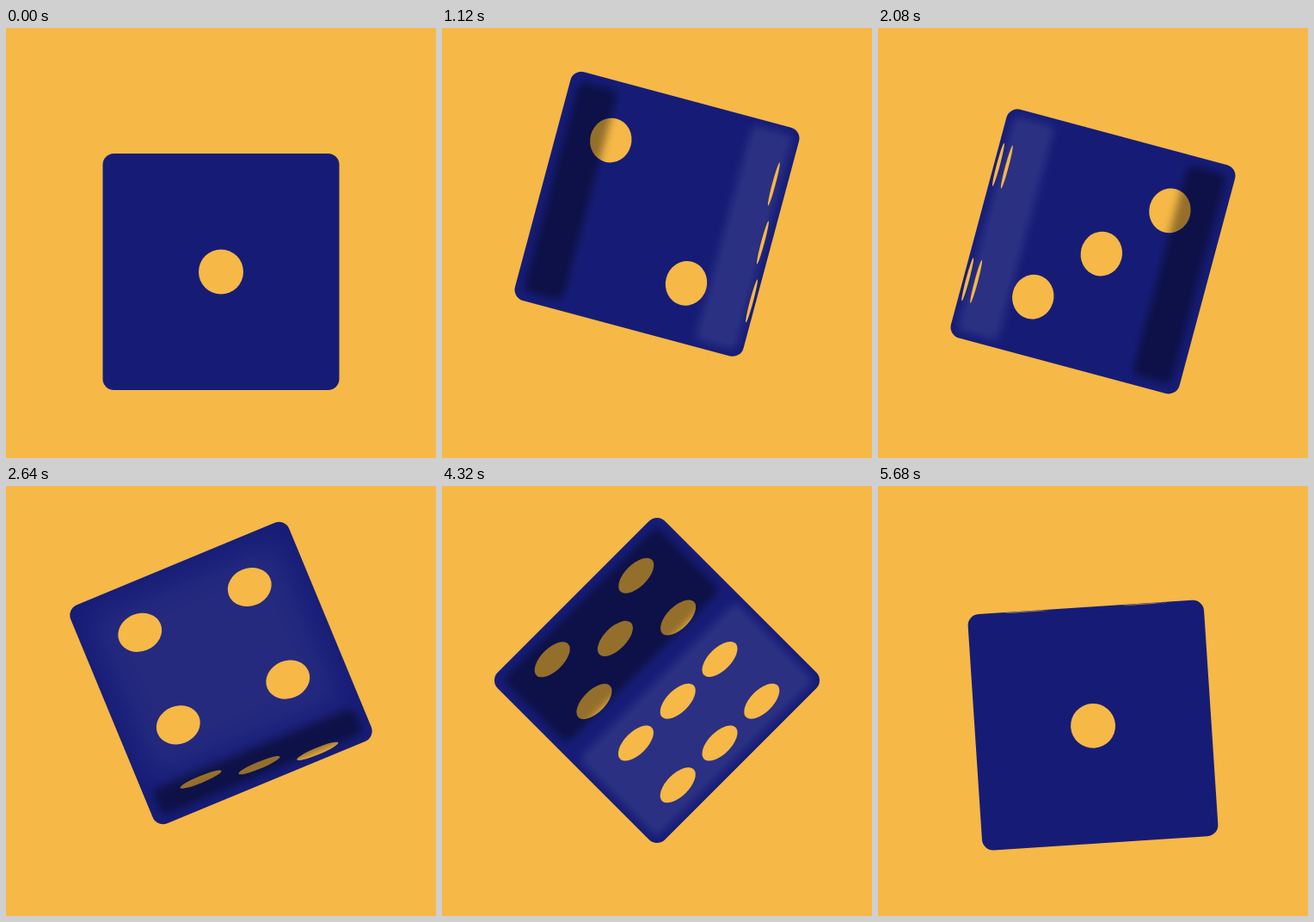
An HTML page that plays this animation: 500x500 px, repeating every 5.72 s.

```html
<!DOCTYPE html>
<html lang="en">
<head>
<meta charset="utf-8">
<title>Rolling die</title>
<style>
  html, body { margin: 0; width: 100%; height: 100%; overflow: hidden; background: #f6b847; }
  svg { display: block; width: 100%; height: 100%; }
</style>
</head>
<body>
<svg viewBox="0 0 500 500">
  <defs>
    <clipPath id="body"><rect x="-137.5" y="-137.5" width="275" height="275" rx="13"/></clipPath>
    <filter id="softLight" filterUnits="userSpaceOnUse" x="-230" y="-230" width="460" height="460" color-interpolation-filters="sRGB">
      <feGaussianBlur id="lightBlur" stdDeviation="5"/>
    </filter>
    <filter id="softDark" filterUnits="userSpaceOnUse" x="-230" y="-230" width="460" height="460" color-interpolation-filters="sRGB">
      <feGaussianBlur stdDeviation="5"/>
    </filter>
  </defs>
  <rect width="500" height="500" fill="#f6b847"/>
  <g id="die">
    <rect x="-137.5" y="-137.5" width="275" height="275" rx="13" fill="#161c76"/>
    <g clip-path="url(#body)">
      <rect id="light" rx="8" fill="#fff" filter="url(#softLight)"/>
      <g id="leaving" fill="#f6b847"></g>
      <g id="entering" fill="#f6b847"></g>
      <rect id="dark" rx="8" fill="#000" fill-opacity=".4" filter="url(#softDark)"/>
    </g>
  </g>
</svg>
<script>
const FRAME = 40, LOOP = 5720, TURN = 24, LAST = 142;
const SIZE = 275, HALF = SIZE / 2, GAP = 69, DOT = 26;
const FLOOR = 283.5, JUMP = 68;
const SIDES = [1, 1, -1, -1, 1, 1]; // side from which the next face enters

const corners = [[-1, -1], [1, -1], [-1, 1], [1, 1]];
const faces = [
  [[0, 0]],
  [[1, -1], [-1, 1]],
  [[-1, -1], [0, 0], [1, 1]],
  corners,
  [...corners, [0, 0]],
  [...corners, [-1, 0], [1, 0]]
];

const el = id => document.getElementById(id);
const set = (node, attrs) => {
  for (const name in attrs) node.setAttribute(name, attrs[name]);
};
const smooth = x => x * x * (3 - 2 * x);
const dots = points => points.map(([x, y]) =>
  `<circle cx="${x * GAP}" cy="${y * GAP}" r="${DOT}"/>`).join('');
const quarterTurn = points => points.map(([x, y]) => [-y, x]);

function easeOut(x) {
  const curve = (s, a, b) => 3 * (1 - s) ** 2 * s * a + 3 * (1 - s) * s * s * b + s ** 3;
  let low = 0, high = 1;
  for (let i = 0; i < 30; i++) {
    const mid = (low + high) / 2;
    if (curve(mid, 0.25, 0.32) < x) low = mid; else high = mid;
  }
  return curve(low, 0.45, 1);
}

function squash(node, x, scale) {
  set(node, { transform: `translate(${x} 0) scale(${scale} 1)` });
}

// A band along one side: outer and inner are distances from that side.
function band(node, side, outer, inner, inset) {
  const width = Math.max(0, inner - outer);
  set(node, {
    x: side > 0 ? HALF - outer - width : outer - HALF,
    y: inset - HALF,
    width,
    height: SIZE - 2 * inset,
    visibility: width > 0 ? 'visible' : 'hidden'
  });
}

let shown = -1;

function draw(time) {
  let step = Math.floor((time % LOOP) / FRAME);
  if (step >= LAST) step++; // the loop closes one step short
  const turn = Math.floor(step / TURN);
  const q = (step % TURN) / TURN;
  const side = SIDES[turn];

  const bounce = (step % (2 * TURN)) / TURN;
  const y = FLOOR - JUMP * easeOut(bounce > 1 ? 2 - bounce : bounce);
  set(el('die'), { transform: `translate(250 ${y}) rotate(${90 * q})` });

  if (turn !== shown) {
    el('leaving').innerHTML = dots(quarterTurn(faces[turn]));
    el('entering').innerHTML = dots(faces[(turn + 1) % 6]);
    shown = turn;
  }
  const part = smooth(q);
  squash(el('entering'), side * HALF * (1 - part), part);
  squash(el('leaving'), -side * HALF * part, 1 - part);

  const grow = HALF * (2 * q) ** 0.8;
  const lightWidth = q < 0.5 ? grow : SIZE * part;
  const darkWidth = q < 0.5 ? grow : SIZE * (1 - part);
  const soft = Math.max(0, 2 * q - 1);
  const inset = 8 + 24 * soft;
  band(el('light'), side, inset, lightWidth - 24 * soft, inset);
  set(el('light'), { 'fill-opacity': 0.09 * Math.max(0, 1 - 1.2 * soft * soft) });
  set(el('lightBlur'), { stdDeviation: 5 + 24 * soft });
  band(el('dark'), -side, 10, darkWidth - 22 * Math.sin(Math.PI * q) ** 12, 11);
}

const start = performance.now();
function tick() {
  draw(performance.now() - start);
  requestAnimationFrame(tick);
}
tick();
</script>
</body>
</html>
```
